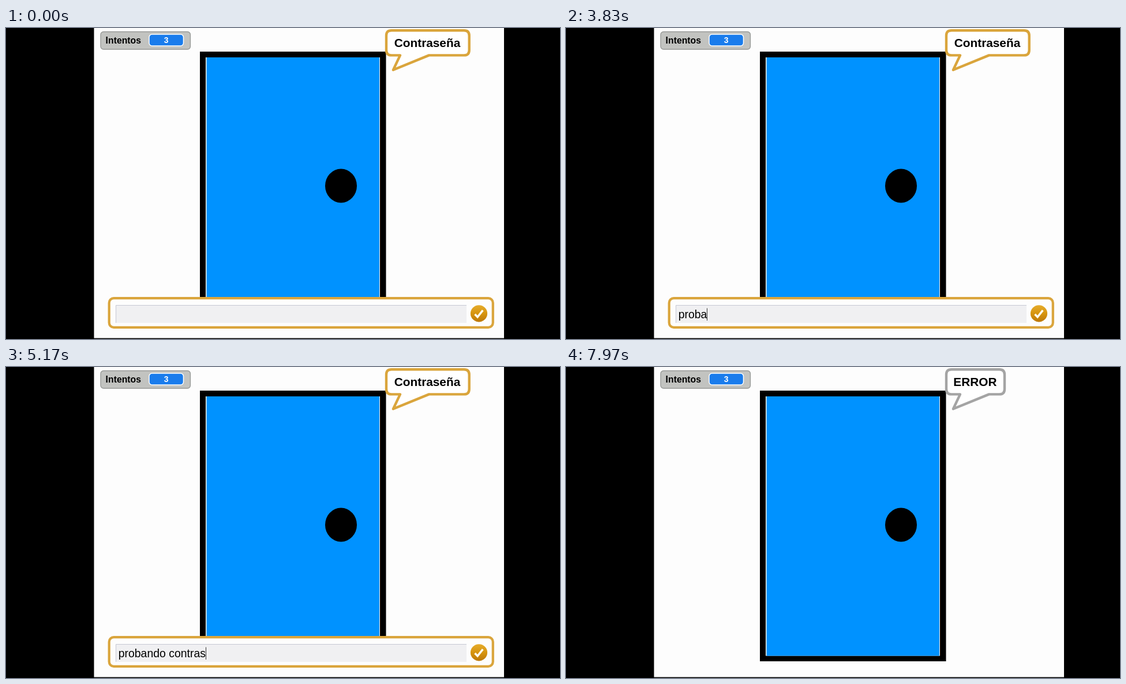
An HTML page that plays this animation: 960 px wide and 540 px high, repeating every 8000 ms.

```html
<!DOCTYPE html>
<html lang="es">
<head>
<meta charset="utf-8">
<title>Contraseña</title>
<style>
  html, body { margin: 0; width: 100%; height: 100%; overflow: hidden; background: #000; }
  svg { display: block; width: 100%; height: 100%; }
  text { font-family: "Liberation Sans", Arial, sans-serif; fill: #000; white-space: pre; }
  .bold { font-weight: bold; }
</style>
</head>
<body>
<svg viewBox="0 0 960 540">
  <defs>
    <linearGradient id="gold" x1="0" y1="0" x2="0" y2="1">
      <stop offset="0" stop-color="#e6ac2c"/>
      <stop offset="0.5" stop-color="#d6940f"/>
      <stop offset="1" stop-color="#bd7808"/>
    </linearGradient>
  </defs>

  <rect width="960" height="540" fill="#000"/>
  <rect x="152.5" width="710.5" height="538.5" fill="#fdfdfd"/>

  <g id="door">
    <rect x="336" y="41" width="322.5" height="470" fill="#000"/>
    <rect x="346" y="51" width="302" height="450.5" fill="#f4f8fa"/>
    <rect x="347.5" y="51" width="299.5" height="450.5" fill="#0092ff"/>
    <ellipse cx="580.5" cy="274" rx="27.5" ry="29.5" fill="#000"/>
  </g>

  <g id="counter">
    <rect x="164" y="6.5" width="155.5" height="30.5" rx="5" fill="#c2c3c0" stroke="#969896" stroke-width="1.3"/>
    <text class="bold" x="172.6" y="27" font-size="15.8">Intentos</text>
    <rect x="248" y="11" width="59.5" height="20" rx="5" fill="#1a7cec" stroke="#fff" stroke-width="1.5"/>
    <text class="bold" x="277.7" y="25.7" font-size="14" text-anchor="middle" style="fill:#fff">3</text>
  </g>

  <g id="bubble">
    <path id="outline" fill="#fff" stroke-width="4.4" stroke-linejoin="round"/>
    <text id="speech" class="bold" y="33" font-size="20.8"></text>
  </g>

  <g id="prompt">
    <rect x="178.7" y="469.2" width="665.1" height="50.6" rx="8" fill="#fdfdfd" stroke="#daa53c" stroke-width="4.2"/>
    <rect x="190" y="481" width="608" height="31" fill="#f0f0f2"/>
    <path d="M190.5 512V481.5H798" fill="none" stroke="#c6c8d4"/>
    <text id="typed" x="194.7" y="504" font-size="19.46"></text>
    <rect id="caret" y="486.5" width="1" height="21.5" fill="#333"/>
    <circle cx="819.5" cy="495.8" r="14.6" fill="url(#gold)"/>
    <path d="M812.5 497l4.6 4.8 9.2-11.6" fill="none" stroke="#fffbf0" stroke-width="3.6"/>
  </g>
</svg>
<script>
  const LOOP = 8000, SUBMIT = 5930;
  const ANSWER = "probando contraseña";
  // Moment each key of the answer lands, in ms.
  const KEYS = [3100, 3400, 3510, 3630, 3750, 3870, 3970, 4070, 4170, 4430,
                4470, 4500, 4730, 4860, 4990, 5120, 5250, 5390, 5530];
  const $ = id => document.getElementById(id);
  const outline = $("outline"), speech = $("speech"), prompt = $("prompt");
  const typed = $("typed"), caret = $("caret");

  const bubblePath = right =>
    `M668 4.2H${right - 9}Q${right} 4.2 ${right} 13.2V38.2Q${right} 47.4 ${right - 9} 47.4` +
    `H733L671 72.8L683 47.4H668Q659 47.4 659 38.2V13.2Q659 4.2 668 4.2Z`;

  function say(words, x, right, color) {
    speech.textContent = words;
    speech.setAttribute("x", x);
    outline.setAttribute("d", bubblePath(right));
    outline.setAttribute("stroke", color);
  }

  function draw(t) {
    const asking = t < SUBMIT;
    prompt.style.display = asking ? "" : "none";
    if (!asking) {
      say("ERROR", 671.3, 760, "#a4a4a4");
      return;
    }
    say("Contraseña", 672.8, 802.7, "#daa53c");
    const count = KEYS.filter(k => k <= t).length;
    typed.textContent = ANSWER.slice(0, count);
    const width = count ? typed.getComputedTextLength() : 0;
    caret.setAttribute("x", Math.round(194.5 + width));
    const lit = (t >= 1960 && t < 2470) || t >= 3000;
    caret.style.display = lit ? "" : "none";
  }

  const start = performance.now();
  function tick() {
    draw((performance.now() - start) % LOOP);
    requestAnimationFrame(tick);
  }
  draw(0);
  requestAnimationFrame(tick);
</script>
</body>
</html>
```
